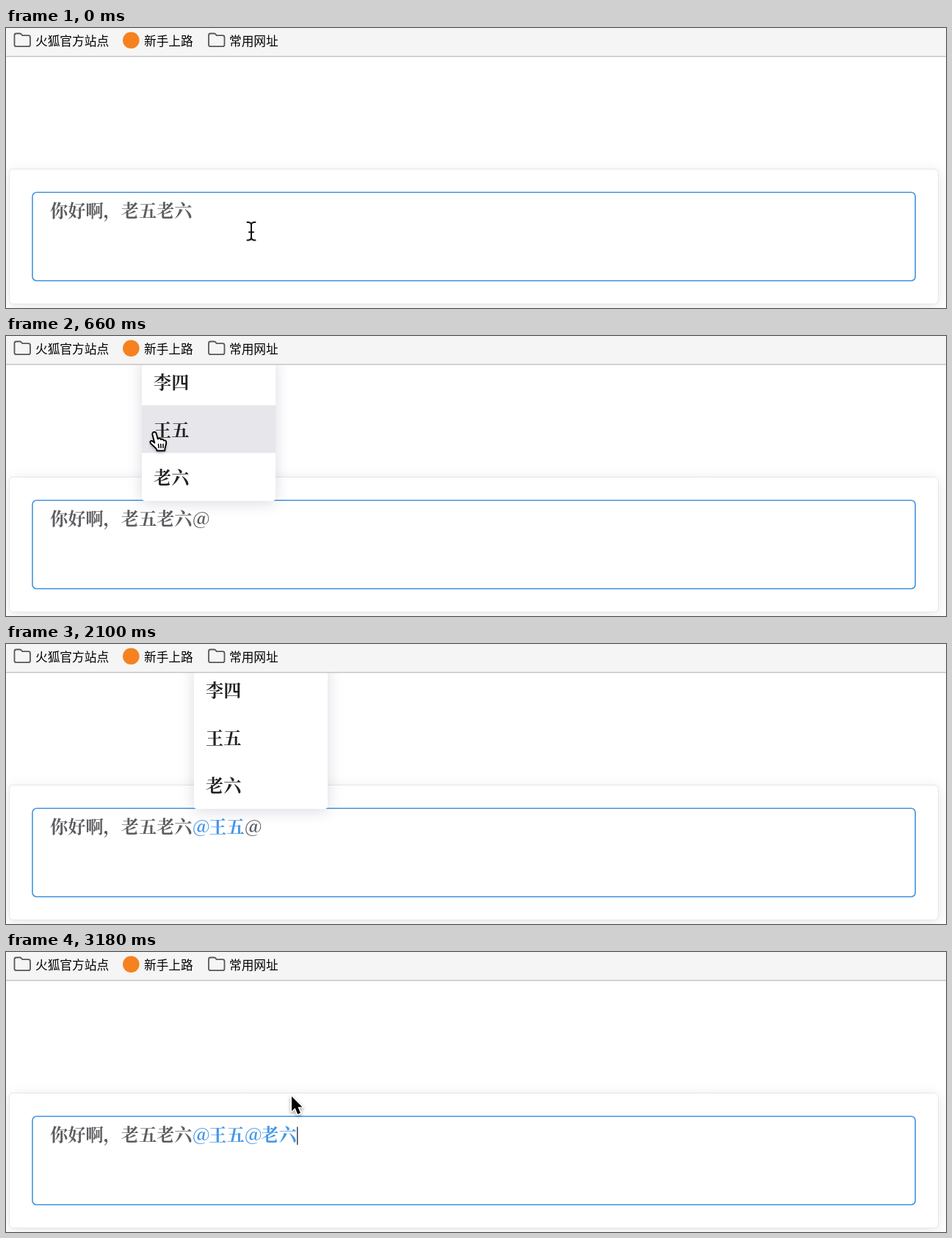
Recreate the animation shown at these times as an HTML page with a canvas. Size 1280x382 px, loop 3.24 s.

```html
<!DOCTYPE html>
<html lang="zh-CN">
<head>
<meta charset="utf-8">
<style>
  html, body { margin: 0; width: 100%; height: 100%; overflow: hidden; background: #fff; }
  canvas { display: block; width: 100vw; height: 100vh; }
</style>
</head>
<body>
<canvas id="stage" width="1280" height="382"></canvas>
<script>
const ctx = document.getElementById('stage').getContext('2d');
const LOOP = 3240, STEP = 60;
const SERIF = 'bold 24.2px "Songti SC", "Noto Serif CJK SC", "Noto Sans CJK SC", "Noto Sans CJK", serif';
const SANS = '16.7px "Noto Sans CJK SC", "Noto Sans CJK", sans-serif';
const BLUE = '#4596e6', GRAY = '#5c5d60';

const ROWS = ['李四', '王五', '老六'];
const ROW_TOP = 29.5, ROW_H = 65, POPUP_W = 182, POPUP_END = 225;

// [time, x, y] of the pointer's hot spot
const PATH = [
  [0, 334, 277], [360, 334, 277], [600, 202, 132], [840, 202, 132], [1080, 210, 130],
  [1200, 210, 130], [1560, 421, 242], [2400, 421, 242], [2580, 419, 222],
  [2760, 389, 197], [LOOP, 389, 197]
];
const POPUPS = [[180, 1200, 185], [1920, 2880, 256]];
const HIDDEN = [[180, 360], [1920, 2400]];
const PRESSED = [[1140, 1200], [2820, 2880]];
const CARET = [[780, 1020], [1200, 1500], [2280, 2520], [2880, LOOP]];

const within = (t, spans) => spans.find(s => t >= s[0] && t < s[1]);

function pointerAt(t) {
  const i = PATH.findIndex((p, n) => n > 0 && t < p[0]);
  const [t0, x0, y0] = PATH[i - 1], [t1, x1, y1] = PATH[i];
  const k = (t - t0) / (t1 - t0), e = k * k * (3 - 2 * k);
  return { x: x0 + (x1 - x0) * e, y: y0 + (y1 - y0) * e };
}

function text(str, x, y, color, font = SERIF) {
  ctx.font = font;
  ctx.fillStyle = color;
  ctx.fillText(str, x, y);
}

function box(x, y, w, h, r, fill, stroke, line = 1) {
  ctx.beginPath();
  ctx.roundRect(x, y, w, h, r);
  if (fill) { ctx.fillStyle = fill; ctx.fill(); }
  if (stroke) { ctx.strokeStyle = stroke; ctx.lineWidth = line; ctx.stroke(); }
}

function shadowed(color, blur, dy, draw) {
  ctx.save();
  ctx.shadowColor = color;
  ctx.shadowBlur = blur;
  ctx.shadowOffsetY = dy;
  draw();
  ctx.restore();
}

function folder(x) {
  ctx.strokeStyle = '#58585a';
  ctx.lineWidth = 1.8;
  ctx.stroke(new Path2D(`M${x} 10 q0-2.5 2.5-2.5 h5 q1.5 0 2.2 1.2 l1 1.5 h8.3 q2.5 0 2.5 2.5
    v10 q0 2.5-2.5 2.5 h-16.5 q-2.5 0-2.5-2.5 z`));
}

function toolbar() {
  ctx.fillStyle = '#f5f5f5';
  ctx.fillRect(0, 0, 1280, 38);
  ctx.fillStyle = '#c6c6c6';
  ctx.fillRect(0, 38, 1280, 1.5);
  folder(11.5);
  folder(276);
  ctx.beginPath();
  ctx.arc(170.3, 16.8, 11.3, 0, Math.PI * 2);
  ctx.fillStyle = '#f5821f';
  ctx.fill();
  text('火狐官方站点', 40, 23.8, '#000', SANS);
  text('新手上路', 188, 23.8, '#000', SANS);
  text('常用网址', 304, 23.8, '#000', SANS);
}

function card() {
  shadowed('rgba(0,0,0,.1)', 18, 3, () => box(4.5, 192.5, 1265, 184, 5, '#fff'));
  box(4.5, 192.5, 1265, 184, 5, null, '#e4e6ea');
  box(36, 224.3, 1202.2, 120.5, 5.5, '#fff', '#4494de', 1.6);
}

function message(t) {
  const y = 258.2;
  let end = 254;
  text('你好啊，老五老六', 60, y, GRAY);
  if (t >= 180) {
    const picked = t >= 1200;
    text('@', 254, y, picked ? BLUE : GRAY);
    end = 276;
    if (picked) {
      text('王五', 276.3, y, BLUE);
      end = 325;
    }
  }
  if (t >= 1920) {
    const picked = t >= 2880;
    text('@', 325, y, picked ? BLUE : GRAY);
    end = 347;
    if (picked) {
      text('老六', 347.3, y, BLUE);
      end = 396;
    }
  }
  if (within(t, CARET)) {
    ctx.fillStyle = '#444';
    ctx.fillRect(end, 238.5, 1.5, 24.5);
  }
}

function popup(x, hover) {
  shadowed('rgba(30,30,80,.16)', 20, 3, () =>
    box(x, ROW_TOP, POPUP_W, POPUP_END - ROW_TOP, 4, '#fff'));
  ROWS.forEach((name, i) => {
    const y = ROW_TOP + i * ROW_H;
    if (i === hover) box(x, y, POPUP_W, ROW_H, i === 2 ? [0, 0, 4, 4] : 0, '#e6e6eb');
    text(name, x + 16, y + 42.4, '#222');
  });
}

const ARROW = new Path2D('M0 0 V20 L4.6 15.8 L8.2 24.2 L12 22.5 L8.4 14.4 H14.5 Z');
const BEAM = new Path2D(`M-5.5-12 Q0-12.5 0-8 Q0-12.5 5.5-12 M0-8 V8
  M-5.5 12.5 Q0 13 0 8 Q0 13 5.5 12.5 M-3 1.5 H3`);
const HAND = new Path2D(`M-2.6 2.5 C-3.4-1.8 2-2 2.6 1 L4.8 8.5 C6 7 8.6 7.4 9 9.4
  C10.3 8.2 12.3 8.8 12.7 10.6 C14.6 9.8 16.2 11 16.2 13 C16.4 17 14.3 19 14.2 24.5 H3.6
  C3.3 20.5-1.5 18.5-4.5 15 C-7.5 11.8-4.2 9.8-1.8 12 L.3 13.8 Z`);
const CREASES = new Path2D('M5.5 15.5 L6 20.5 M8.7 15.5 L9 20.5 M12 15.5 V20.5');

function pointer({ x, y }, shape) {
  ctx.save();
  ctx.translate(x, y);
  ctx.lineJoin = ctx.lineCap = 'round';
  const line = (path, color, width) => {
    ctx.strokeStyle = color;
    ctx.lineWidth = width;
    ctx.stroke(path);
  };
  if (shape === 'beam') {
    line(BEAM, '#fff', 4);
    line(BEAM, '#111', 2);
  } else if (shape === 'hand') {
    shadowed('rgba(0,0,0,.35)', 4, 2, () => { ctx.fillStyle = '#fff'; ctx.fill(HAND); });
    line(HAND, '#000', 1.9);
    line(CREASES, '#000', 1.5);
  } else {
    shadowed('rgba(0,0,0,.4)', 4, 2, () => line(ARROW, '#fff', 3));
    ctx.fillStyle = '#000';
    ctx.fill(ARROW);
  }
  ctx.restore();
}

function render(t) {
  const p = pointerAt(t);
  const open = within(t, POPUPS);
  const shown = !within(t, HIDDEN);
  const over = open && shown && p.x >= open[2] && p.x < open[2] + POPUP_W && p.y < POPUP_END;
  const hover = over && p.y < 220 ? Math.floor((p.y - ROW_TOP) / ROW_H) : -1;

  ctx.fillStyle = '#fff';
  ctx.fillRect(0, 0, 1280, 382);
  card();
  message(t);
  if (open) popup(open[2], hover);
  toolbar();
  if (shown) {
    const shape = over && !within(t, PRESSED) ? 'hand' : !over && p.y > 224 ? 'beam' : 'arrow';
    pointer(p, shape);
  }
}

function tick() {
  const t = performance.now() % LOOP;
  render(Math.floor(t / STEP) * STEP);
  requestAnimationFrame(tick);
}
tick();
</script>
</body>
</html>
```
